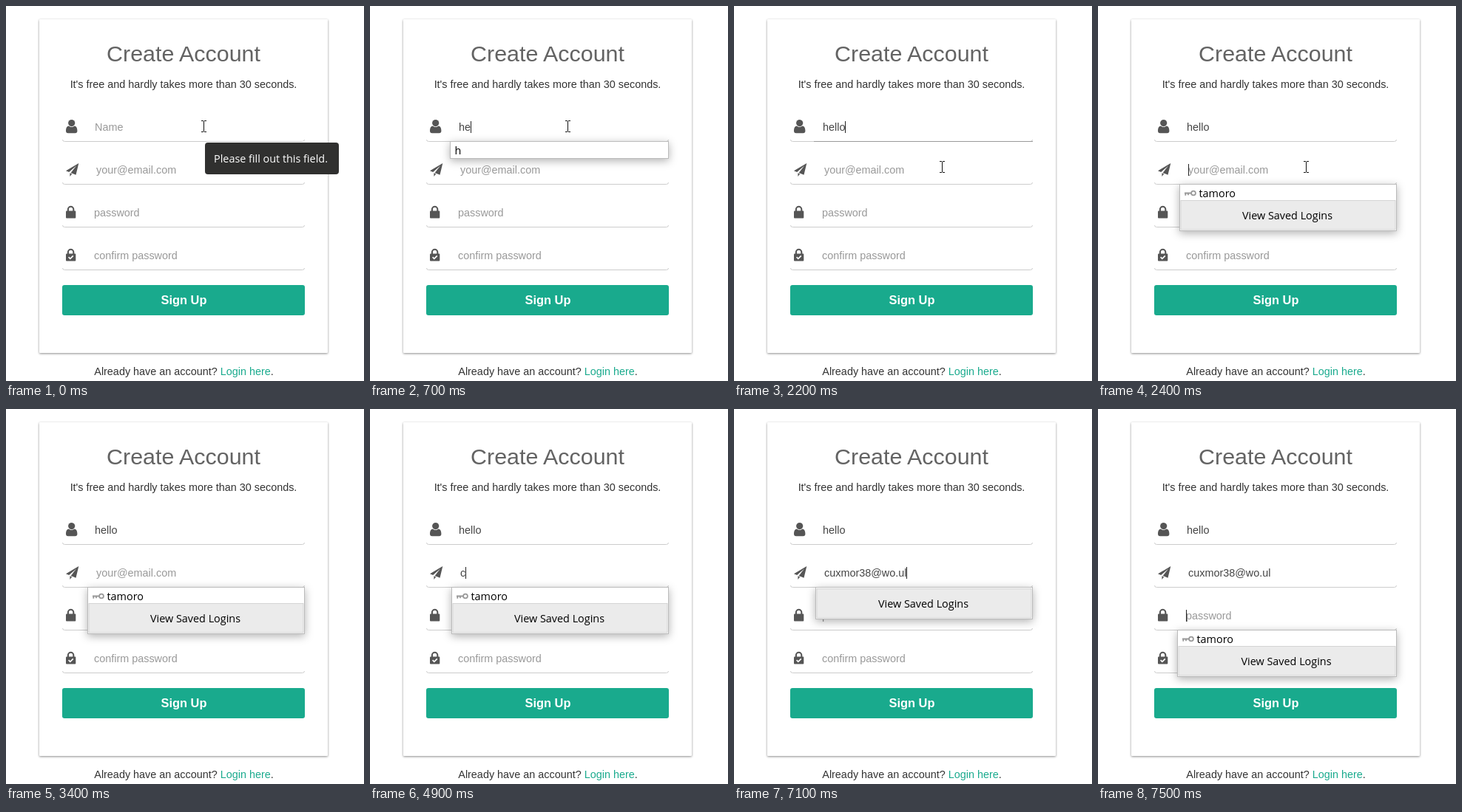
Write an HTML page that moves like this. It is 484 px wide and 508 px high and loops after 8 s.

```html
<!DOCTYPE html>
<html lang="en">
<head>
<meta charset="utf-8">
<title>Create Account</title>
<style>
  html, body { margin: 0; width: 100%; height: 100%; overflow: hidden; background: #fff; }
  svg { display: block; }
  text { font: 14.4px "Liberation Sans", Arial, sans-serif; fill: #333; white-space: pre; }
  .title { font-size: 30.4px; fill: #636363; }
  .mid { text-anchor: middle; }
  .button { font-size: 16.4px; font-weight: bold; fill: #fff; }
  .link { fill: #19aa8d; }
  .field { fill: #444; }
  .field.empty { fill: #999; }
  .ui { font-family: "Open Sans", "Noto Sans", sans-serif; fill: #000; }
  .tip { fill: #fff; }
  .card { fill: #fff; filter: drop-shadow(0 1px 1.5px rgba(0, 0, 0, .45)); }
  .popup { fill: #fff; stroke: #bbb; filter: drop-shadow(0 3px 6px rgba(0, 0, 0, .3)); }
  .icon { fill: #555; }
  .line { fill: none; stroke: #ccc; }
</style>
</head>
<body>
<svg width="484" height="508" viewBox="0 0 484 508">
  <defs>
    <g id="lock">
      <path d="M83.9 279v-3.5a3.7 3.7 0 0 1 7.4 0v3.5" fill="none" stroke="#555" stroke-width="2.1"/>
      <rect x="81" y="277.6" width="13.3" height="9.8" rx="1"/>
    </g>
    <path id="beam" d="M-3.5-7.5h3m1 0h3M0-7v14M-3.5 7.5h3m1 0h3"/>
  </defs>

  <rect class="card" x="45" y="18" width="390" height="452" rx="1"/>
  <text class="title mid" x="240" y="75">Create Account</text>
  <text class="mid" x="240" y="111">It's free and hardly takes more than 30 seconds.</text>

  <g class="icon">
    <circle cx="88.7" cy="158.6" r="4.6"/>
    <path d="M81 169.3c0-4 1.2-6.8 4-6.9q3.7 3 7.4 0c2.8.1 4 2.9 4 6.9q0 3-3 3H84q-3 0-3-3z"/>
    <path d="M98.3 213L81 223.3l4.2 1.8 10-8.8-7.6 9.6 6.9 2.8zM86.4 226.2v4.8l2.8-3.5z"/>
    <use href="#lock"/>
    <use href="#lock" y="58"/>
    <path d="M84.6 340.2l2.2 2.2 4-4" fill="none" stroke="#fff" stroke-width="1.7"/>
  </g>

  <g id="fields"></g>
  <rect id="focus" height="1" fill="#999"/>
  <rect id="caret" width="1" height="16" fill="#222"/>

  <rect x="76" y="378" width="328" height="41" rx="3" fill="#19aa8d"/>
  <text class="button mid" x="240.5" y="404">Sign Up</text>
  <text class="mid" x="240.5" y="500">Already have an account? <tspan class="link">Login here</tspan>.</text>

  <g id="tip">
    <rect x="269" y="185" width="181" height="43" rx="4" fill="#30302f"/>
    <text class="ui tip" x="281" y="212">Please fill out this field.</text>
  </g>

  <g id="history">
    <rect class="popup" x="108.5" y="183.5" width="295" height="23"/>
    <text class="ui" x="114.4" y="201">h</text>
  </g>

  <g id="logins">
    <rect class="popup" id="frame" x=".5" y=".5"/>
    <g id="saved">
      <g fill="none" stroke="#999" stroke-width="1.8">
        <circle cx="19" cy="12.5" r="2.9"/>
        <path d="M16 12.5H7M8.3 12.5v3.3M12 12.5v2.8"/>
      </g>
      <text class="ui" x="26.5" y="18">tamoro</text>
    </g>
    <g id="view">
      <rect id="bar" x="2" y="22.5" height="39.5" fill="#ebebeb" stroke="#ccc" stroke-width=".8"/>
      <text class="ui mid" id="label" y="48">View Saved Logins</text>
    </g>
  </g>

  <g id="mouse" fill="none">
    <use href="#beam" stroke="#fff" stroke-width="3"/>
    <use href="#beam" stroke="#111"/>
  </g>
</svg>
<script>
const LOOP = 8000, ROW = 58, RIGHT = 404;
const $ = id => document.getElementById(id);
const set = (el, attrs) => { for (const k in attrs) el.setAttribute(k, attrs[k]); };
const show = (el, on) => set(el, { display: on ? "inline" : "none" });

// left: where the input starts; keys: when each character is typed
const fields = [
  { left: 108, hint: "Name", value: "hello", keys: [500, 700, 1400, 1500, 1600] },
  { left: 110, hint: "your@email.com", value: "cuxmor38@wo.ul",
    keys: [4900, 5000, 5200, 5700, 5700, 5800, 6000, 6100, 6300, 6500, 6700, 6900, 7000, 7100] },
  { left: 107, hint: "password", value: "", keys: [] },
  { left: 107, hint: "confirm password", value: "", keys: [] }
];

$("fields").innerHTML = fields.map((f, i) => `<g transform="translate(0 ${i * ROW})">
  <path class="line" d="M76.5 181q0 2.5 3 2.5H400.5q3 0 3-2.5"/>
  <text class="field" x="${f.left + 12}" y="169"></text></g>`).join("");
const labels = document.querySelectorAll(".field");

function drawFields(t) {
  fields.forEach((f, i) => {
    const typed = f.value.slice(0, f.keys.filter(k => t >= k).length);
    labels[i].textContent = typed || f.hint;
    labels[i].classList.toggle("empty", !typed);
    f.width = typed ? labels[i].getComputedTextLength() : 0;
  });
  const row = t < 400 ? -1 : t < 2300 ? 0 : t < 7400 ? 1 : 2;
  const f = fields[row];
  show($("focus"), f);
  show($("caret"), f && !(t >= 3400 && t < 4600));
  if (!f) return;
  set($("focus"), { x: f.left, y: 183 + row * ROW, width: RIGHT - f.left });
  set($("caret"), { x: Math.floor(f.left + 12 + f.width), y: 156 + row * ROW });
}

function drawLogins(t) {
  const row = t < 7400 ? 1 : 2, { left } = fields[row];
  const width = RIGHT - left, small = t >= 5000 && t < 7400;
  show($("logins"), (t >= 2400 && t < 7400) || t >= 7500);
  show($("saved"), !small);
  set($("logins"), { transform: `translate(${left} ${183 + row * ROW})` });
  set($("frame"), { width: width - 1, height: small ? 43 : 63 });
  set($("view"), { transform: `translate(0 ${small ? -20 : 0})` });
  set($("bar"), { width: width - 4 });
  set($("label"), { x: width / 2 - 1 });
}

function drawMouse(t) {
  const p = Math.min(1, Math.max(0, (Math.floor(t / 100) - 16) / 6));
  const e = p * p * (3 - 2 * p);
  show($("mouse"), t < 2500);
  set($("mouse"), { transform: `translate(${267.5 + Math.round(14 * e)} ${163 + Math.round(55 * e)})` });
}

const start = performance.now();
function draw(now) {
  const t = Math.max(0, now - start) % LOOP;
  show($("tip"), t < 400);
  show($("history"), t >= 600 && t < 800);
  drawFields(t);
  drawLogins(t);
  drawMouse(t);
  requestAnimationFrame(draw);
}
draw(start);
</script>
</body>
</html>
```
